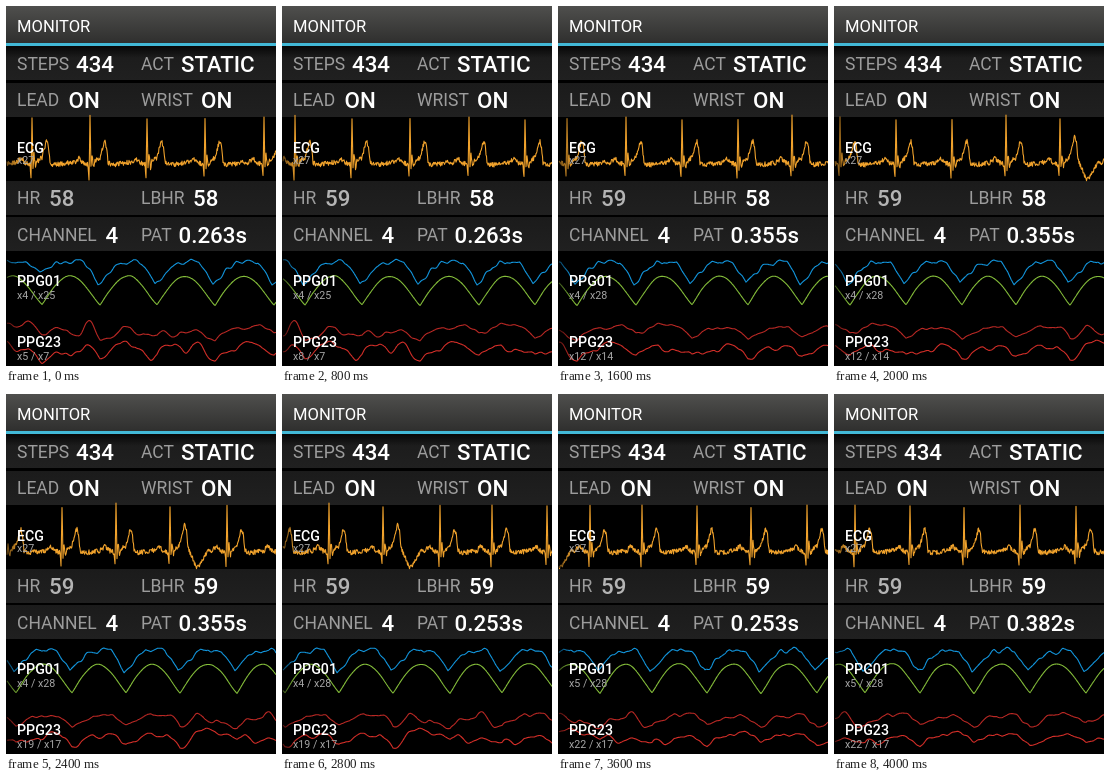
Animation, 270 px wide and 360 px high, one loop 4400 ms. Source, as an HTML page:

```html
<!DOCTYPE html>
<html lang="en">
<head>
<meta charset="utf-8">
<title>Monitor</title>
<style>
  html, body { margin: 0; width: 100%; height: 100%; overflow: hidden; background: #000; }
  svg { display: block; width: 100vw; height: 100vh; }
  text { font-family: Roboto, "Open Sans", sans-serif; fill: #fff; white-space: pre; }
  .title { font-size: 16.6px; }
  .label { font-size: 17.5px; fill: #9c9c9c; }
  .value { font-size: 22.3px; font-weight: 500; }
  .dim { fill: #b4b4b4; }
  .plot { font-size: 14.2px; font-weight: 500; }
  .gain { font-size: 10.7px; fill: #a6a6a6; }
  polyline { fill: none; stroke-width: 1.1; stroke-linejoin: round; }
</style>
</head>
<body>
<svg id="stage" viewBox="0 0 270 360" preserveAspectRatio="none">
  <defs>
    <linearGradient id="head" x2="0" y2="1">
      <stop stop-color="#4f4f4d"/><stop offset="1" stop-color="#2f2f2e"/>
    </linearGradient>
    <linearGradient id="row" x2="0" y2="1">
      <stop stop-color="#1b1b1b"/><stop offset="1" stop-color="#202020"/>
    </linearGradient>
    <linearGradient id="shadow" x2="0" y2="1">
      <stop stop-color="#000" stop-opacity=".75"/><stop offset="1" stop-color="#000" stop-opacity="0"/>
    </linearGradient>
    <linearGradient id="fade">
      <stop stop-color="#000" stop-opacity=".6"/><stop offset="1" stop-color="#000" stop-opacity="0"/>
    </linearGradient>
  </defs>
  <rect width="270" height="360"/>
  <rect width="270" height="37" fill="url(#head)"/>
  <rect y="37" width="270" height="3" fill="#42b8d6"/>
</svg>
<script>
const stage = document.getElementById('stage');
const LOOP = 4400, WIDTH = 270;

function add(tag, attrs, content = '') {
  const node = document.createElementNS('http://www.w3.org/2000/svg', tag);
  for (const key in attrs) node.setAttribute(key, attrs[key]);
  node.textContent = content;
  return stage.appendChild(node);
}
const text = (kind, x, y, content) => add('text', { class: kind, x, y }, content);
const trace = stroke => add('polyline', { stroke });

// Start time, scroll offset, HR, LBHR, PAT, gains of both PPG plots
const steps = [
  [0, 0, 58, 58, '0.263s', 'x4 / x25', 'x5 / x7'],
  [800, 71, 59, 58, '0.263s', 'x4 / x25', 'x8 / x7'],
  [1200, 128, 59, 58, '0.263s', 'x4 / x25', 'x8 / x7'],
  [1600, 190, 59, 58, '0.355s', 'x4 / x28', 'x12 / x14'],
  [2000, 252, 59, 58, '0.355s', 'x4 / x28', 'x12 / x14'],
  [2400, 314, 59, 59, '0.355s', 'x4 / x28', 'x19 / x17'],
  [2800, 377, 59, 59, '0.253s', 'x4 / x28', 'x19 / x17'],
  [3200, 440, 59, 59, '0.253s', 'x4 / x28', 'x19 / x17'],
  [3600, 503, 59, 59, '0.253s', 'x5 / x28', 'x22 / x17'],
  [4000, 566, 59, 59, '0.382s', 'x5 / x28', 'x22 / x17']
];

const beats = [-88, -31, 26, 84, 141, 199, 258, 314, 370, 424, 478, 535, 587, 642, 696, 752, 808, 864];
const ecgShape = [[-16, 0], [-11, -4], [-7, 0], [-2, 2], [-1, 15], [0, -45], [1, 6], [2, -8], [3.5, 5],
  [5, -1], [10, -5], [14, -20], [15, -21], [16.5, -15], [18, 0], [21, 2], [25, 2], [38, 0]];
const pulseShape = [[0, 1], [.12, .7], [.28, .26], [.4, .06], [.5, .16], [.62, 0], [.76, .08], [.88, .5], [1, 1]];

function lerp(points, t) {
  const i = points.findIndex(p => p[0] >= t);
  if (i < 1) return points[i ? points.length - 1 : 0][1];
  const [x0, y0] = points[i - 1], [x1, y1] = points[i];
  return y0 + (y1 - y0) * (t - x0) / (x1 - x0);
}
const bell = (x, mid, width) => Math.exp(-(((x - mid) / width) ** 2));

function rand(n, seed) {
  const v = Math.sin(n * 127.1 + seed * 311.7) * 43758.5453;
  return (v - Math.floor(v)) * 2 - 1;
}
function wander(x, cell, seed) {
  const i = Math.floor(x / cell), f = x / cell - i, s = f * f * (3 - 2 * f);
  return rand(i, seed) * (1 - s) + rand(i + 1, seed) * s;
}
function phase(x) {
  const i = beats.findIndex(b => b > x);
  return (x - beats[i - 1]) / (beats[i] - beats[i - 1]);
}

function ecg(x) {
  const d = x - beats.find(b => x - b < 38);
  const wave = d > -17 ? lerp(ecgShape, d) : 0;
  return 156.5 + wave + rand(x, 1) * 2.4 - 5 * bell(x, 493, 5) + 15 * bell(x, 506, 6);
}
function blue(x) {
  const depth = x < 72 ? 10 : 23;
  return 255 + depth * lerp(pulseShape, phase(x - 8)) + wander(x, 5, 2) * 2.2;
}
function green(x) {
  return 299 - 29 * Math.sin(Math.PI * phase(x - 10) ** .95) ** 1.15 + wander(x, 9, 3) * .7;
}
const unrest = x => .3 + .8 * bell(x, 110, 150) + .8 * bell(x, 560, 55);
function red(x, base, depth, drift, seed) {
  return base + depth * lerp(pulseShape, phase(x - 10))
    + drift * unrest(x) * wander(x, 12, seed) + wander(x, 5, seed + 1) * 1.3;
}

for (const y of [40, 77, 175, 211]) add('rect', { y, width: WIDTH, height: 34, fill: 'url(#row)' });
add('rect', { y: 40, width: WIDTH, height: 12, fill: 'url(#shadow)' });

const traces = [
  [trace('#f0a22c'), ecg],
  [trace('#1295dc'), blue],
  [trace('#84bd3a'), green],
  [trace('#b82824'), x => red(x, 321, 10, 9, 4)],
  [trace('#d22e28'), x => red(x, 341, 10, 10, 8)]
];
for (const [y, height] of [[111, 63], [246, 114]]) add('rect', { y, width: 14, height, fill: 'url(#fade)' });

text('title', 11, 26, 'MONITOR');
const field = (label, x, y, valueX, value = '', dim = '') => {
  text('label', x, y, label);
  return text('value ' + dim, valueX, y + 2, value);
};
field('STEPS', 11, 63.5, 70, '434');
field('ACT', 135, 63.5, 175, 'STATIC');
field('LEAD', 11, 100, 62.5, 'ON');
field('WRIST', 135, 100, 195, 'ON');
field('CHANNEL', 11, 234.5, 99.5, '4');
const readings = [
  field('HR', 11, 197.5, 43, '', 'dim'),
  field('LBHR', 135, 197.5, 187),
  field('PAT', 135, 234.5, 172.5)
];

text('gain', 11, 157.5, 'x27');
readings.push(text('gain', 11, 293, ''), text('gain', 11, 353.5, ''));
text('plot', 11, 147, 'ECG');
text('plot', 11, 280, 'PPG01');
text('plot', 11, 341, 'PPG23');

let shown;
function draw(step) {
  const [, offset, ...values] = step;
  readings.forEach((node, i) => { node.textContent = values[i]; });
  for (const [line, wave] of traces) {
    let points = '';
    for (let x = 1; x <= WIDTH; x += .5) points += `${x},${wave(x + offset).toFixed(1)} `;
    line.setAttribute('points', points);
  }
}
function tick() {
  const time = performance.now() % LOOP;
  const step = steps.findLast(s => s[0] <= time);
  if (step !== shown) draw(shown = step);
  requestAnimationFrame(tick);
}
tick();
</script>
</body>
</html>
```
